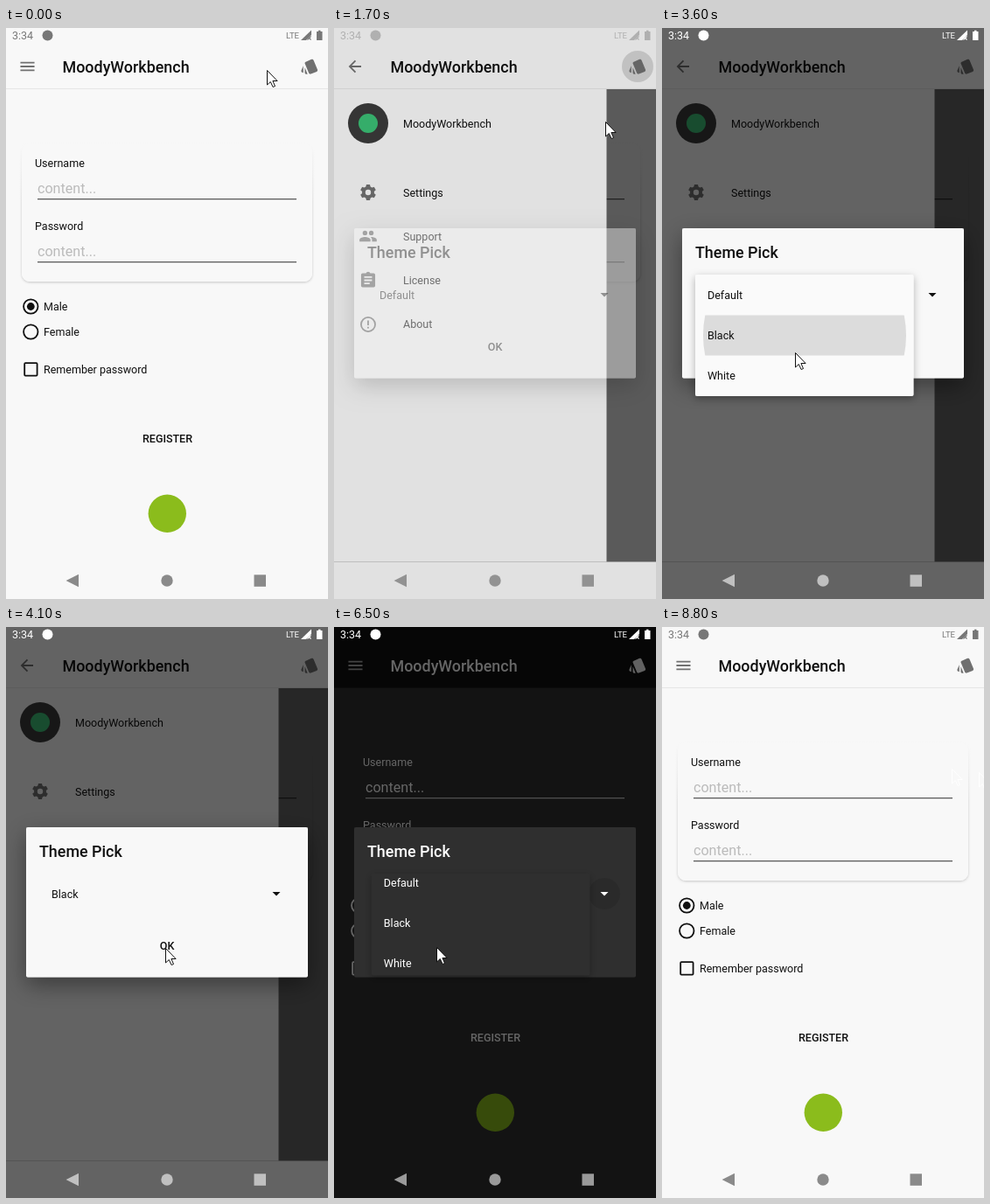
Animation, 368 px wide and 653 px high, one loop 9 s. Source, as an HTML page with a canvas:

```html
<!DOCTYPE html>
<html lang="en">
<head>
<meta charset="utf-8">
<title>Theme picker</title>
<style>
  html, body { margin: 0; width: 100%; height: 100%; overflow: hidden; background: #f8f8f8; }
  canvas { display: block; }
</style>
</head>
<body>
<canvas id="stage" width="368" height="653"></canvas>
<script>
const ctx = document.getElementById('stage').getContext('2d');
const W = 368, H = 653, LOOP = 9000, STEP = 100;
const BAR_BOTTOM = 69, NAV_TOP = 610.5, DRAWER = 311.5;
const DP = 0.895;
const APP_NAME = 'MoodyWorkbench';

const LIGHT = {
  bg: '#f8f8f8', bar: '#f8f8f8', edge: '#e6e6e6', text: '#101010', hint: '#bbb', line: '#5c5c5c',
  icon: '#707070', burger: '#707070', popup: '#fafafa', press: '#dcdcdc', ripple: 'rgba(0,0,0,.14)',
  shadow: 0.4, status: [119, 255], nav: [138, 192]
};
const DARK = {
  bg: '#2f2f2f', bar: '#0e0e0e', edge: '#1c1c1c', text: '#fff', hint: '#fff', line: '#c4c4c4',
  icon: '#f4f4f4', burger: '#a8a8a8', popup: '#2f2f2f', press: '#444', ripple: 'rgba(255,255,255,.12)',
  shadow: 0, status: [255, 255], nav: [180, 154]
};

const ICONS = {
  style: 'M3.9 20.2V11.2L1.4 17c-.4 1 .1 2.2 1.1 2.6zM22 16 17 4c-.4-1-1.6-1.5-2.6-1.1L7.1 6C6 6.4 5.6 7.5 6 8.5l5 12c.4 1 1.6 1.5 2.6 1.1l7.4-3C22 18.1 22.5 17 22 16zM5.9 19.7c0 1.1.9 2 2 2h1.5L5.9 13.4z',
  people: 'M16 11a3 3 0 1 0 0-6 3 3 0 0 0 0 6zM8 11a3 3 0 1 0 0-6 3 3 0 0 0 0 6zM8 13c-2.3 0-7 1.2-7 3.5V19h14v-2.5C15 14.2 10.3 13 8 13zM16 13l-1 .1c1.2.8 2 2 2 3.4V19h6v-2.5C23 14.2 18.3 13 16 13z',
  list: 'M19 3h-4.2a3 3 0 0 0-5.6 0H5a2 2 0 0 0-2 2v14a2 2 0 0 0 2 2h14a2 2 0 0 0 2-2V5a2 2 0 0 0-2-2zM14 17H7v-2h7zM17 13H7v-2h10zM17 9H7V7h10z',
  alert: 'M12 2a10 10 0 1 0 0 20 10 10 0 0 0 0-20zM12 4a8 8 0 1 1 0 16 8 8 0 0 1 0-16zM11 15h2v2h-2zM11 7h2v6h-2z'
};
const CURSOR = new Path2D('M0 0V16.5L3.8 13 6.6 19 9 18 6.4 12H11.6z');

// time, x, y of the pointer tip
const POINTER = [
  [0, 298, 48], [500, 23, 55], [1000, 23, 55], [1400, 343, 42], [1600, 343, 44], [1700, 310, 107],
  [2100, 302, 300], [2600, 302, 300], [2900, 108, 397], [3100, 108, 397], [3400, 108, 354],
  [3500, 108, 354], [3600, 152, 371], [3700, 152, 371], [4000, 182, 367], [4200, 182, 367],
  [4700, 329, 110], [5000, 329, 110], [5400, 344, 45], [5600, 344, 45], [6000, 302, 300],
  [6300, 302, 300], [6500, 117, 366], [6700, 107, 394], [6800, 107, 394], [6900, 107, 392],
  [7200, 107, 392], [7700, 182, 367], [8200, 182, 367], [8600, 331, 162], [8700, 362, 166], [8800, 384, 168]
];

const lerp = (a, b, p) => a + (b - a) * p;
const ramp = (t, start, length) => Math.min(1, Math.max(0, (t - start) / length));
const smooth = p => p * p * (3 - 2 * p);
const gray = v => { v = Math.round(v); return `rgb(${v},${v},${v})`; };

function text(str, x, y, color, size = 12.53, weight = 400, align = 'left') {
  ctx.font = `${weight} ${size}px Roboto, sans-serif`;
  ctx.textAlign = align;
  ctx.fillStyle = color;
  ctx.fillText(str, x, y);
}
function rect(x, y, w, h, color) {
  ctx.fillStyle = color;
  ctx.fillRect(x, y, w, h);
}
function circle(x, y, r, fill, stroke, width = 2) {
  ctx.beginPath();
  ctx.arc(x, y, r, 0, 2 * Math.PI);
  if (fill) { ctx.fillStyle = fill; ctx.fill(); }
  if (stroke) { ctx.strokeStyle = stroke; ctx.lineWidth = width; ctx.stroke(); }
}
function polygon(points, color) {
  ctx.beginPath();
  points.forEach(p => ctx.lineTo(...p));
  ctx.fillStyle = color;
  ctx.fill();
}

// Rounded box whose shadow stays outside it, so it can be translucent
function panel(x, y, w, h, r, color, blur, drop, alpha) {
  const shape = new Path2D(), outside = new Path2D();
  shape.roundRect(x, y, w, h, r);
  outside.rect(0, 0, W, H);
  outside.addPath(shape);
  ctx.save();
  ctx.clip(outside, 'evenodd');
  ctx.shadowColor = `rgba(0,0,0,${alpha})`;
  ctx.shadowBlur = blur;
  ctx.shadowOffsetY = drop;
  ctx.fillStyle = color;
  ctx.fill(shape);
  ctx.restore();
  ctx.fillStyle = color;
  ctx.fill(shape);
}
function icon(name, cx, cy, color) {
  ctx.save();
  ctx.translate(cx - 12 * DP, cy - 12 * DP);
  ctx.scale(DP, DP);
  ctx.fillStyle = color;
  ctx.fill(new Path2D(ICONS[name]), 'evenodd');
  ctx.restore();
}
function gear(cx, cy, color) {
  circle(cx, cy, 5.1, null, color, 3.8);
  for (let i = 0; i < 6; i++) {
    ctx.save();
    ctx.translate(cx, cy);
    ctx.rotate(i * Math.PI / 3);
    polygon([[-2.7, -6], [-2, -9], [2, -9], [2.7, -6]], color);
    ctx.restore();
  }
}

// Hamburger (p = 0) turning into a back arrow (p = 1)
function menuIcon(p, closing, color) {
  const head = lerp(18, 8 * Math.SQRT2, p), shaft = lerp(18, 16, p), cut = lerp(0, 0.7, p);
  const angle = p * Math.PI / 4, offset = lerp(5, -0.7, p);
  const dx = head * Math.cos(angle), dy = head * Math.sin(angle);
  ctx.save();
  ctx.translate(24.5, 44);
  ctx.scale(DP, DP);
  ctx.rotate((closing ? 1 : -1) * Math.PI * (1 - p));
  ctx.beginPath();
  ctx.moveTo(-shaft / 2 + cut, 0);
  ctx.lineTo(shaft / 2 - cut, 0);
  for (const side of [1, -1]) {
    ctx.moveTo(-shaft / 2, side * offset);
    ctx.lineTo(-shaft / 2 + dx, side * (offset + dy));
  }
  ctx.strokeStyle = color;
  ctx.lineWidth = 2;
  ctx.stroke();
  ctx.restore();
}

function form(c) {
  if (c === LIGHT) {
    panel(18, 132, 332, 158, 9, c.bg, 3, 1, 0.2);
    const fade = ctx.createLinearGradient(0, 126, 0, 200);
    fade.addColorStop(0, c.bg);
    fade.addColorStop(1, 'rgba(248,248,248,0)');
    rect(10, 126, 348, 74, fade);
  }
  [['Username', 159], ['Password', 231]].forEach(([label, y]) => {
    text(label, 33, y, c.text);
    text('content...', 36, y + 30, c.hint, 16.1);
    rect(36, y + 36, 296, 1.3, c.line);
  });
  [['Male', 318.5], ['Female', 347.5]].forEach(([label, y]) => {
    circle(28.3, y, 8.2, null, c.text, 1.8);
    text(label, 43, y + 4.8, c.text);
  });
  circle(28.3, 318.5, 4.4, c.text);
  ctx.lineWidth = 1.8;
  ctx.beginPath();
  ctx.roundRect(21.2, 383.2, 14.4, 14.4, 1);
  ctx.stroke();
  text('Remember password', 43, 395, c.text);
  text('REGISTER', 184.5, 474, c.text, 12.53, 500, 'center');
  circle(184.3, 555.3, 21.7, '#8bbc1c');
}

function drawer(c, open) {
  ctx.save();
  ctx.beginPath();
  ctx.rect(0, BAR_BOTTOM, W, NAV_TOP - BAR_BOTTOM);
  ctx.clip();
  rect(0, 0, W, H, `rgba(0,0,0,${0.6 * open})`);
  ctx.translate(DRAWER * (open - 1), 0);
  rect(0, BAR_BOTTOM, DRAWER, H, c.bg);
  circle(39, 109, 23, '#3a3a3a');
  circle(39, 109, 11, '#3bbf75');
  text(APP_NAME, 79, 113.5, c.text);
  gear(39, 188, c.icon);
  icon('people', 39, 238, c.icon);
  icon('list', 39, 288.5, c.icon);
  icon('alert', 39, 339, c.icon);
  ['Settings', 'Support', 'License', 'About'].forEach((s, i) => text(s, 79, 192.7 + i * 50.2, c.text));
  ctx.restore();
}

function statusBar(color) {
  text('3:34', 7, 13, color, 12.53);
  circle(47.5, 8.5, 6, color);
  text('LTE', 320, 12, color, 9.6);
  polygon([[337, 14], [349, 2.5], [349, 8], [343, 14]], color);
  ctx.strokeStyle = color;
  ctx.lineWidth = 1.1;
  ctx.beginPath();
  ctx.moveTo(344.5, 9.5); ctx.lineTo(348.5, 13.5);
  ctx.moveTo(348.5, 9.5); ctx.lineTo(344.5, 13.5);
  ctx.stroke();
  rect(355, 4, 6.5, 10, color);
  rect(357, 2.7, 2.5, 2, color);
}

function navBar(color) {
  polygon([[68.6, 632], [83, 624.7], [83, 639.3]], color);
  circle(184, 632, 6.7, color);
  rect(283.5, 625.3, 13.5, 13.5, color);
}

function dialog(c, alpha, choice, rippling) {
  ctx.save();
  ctx.globalAlpha = alpha;
  panel(23, 229, 322, 171.5, 2, c.bg, 26, 9, c.shadow);
  text('Theme Pick', 38, 262.5, c.text, 17.9, 500);
  text(choice, 52, 310, c.text);
  if (rippling) circle(309, 305, 18, 'rgba(0,0,0,.1)');
  polygon([[304.5, 303], [313.5, 303], [309, 307.5]], c.text);
  text('OK', 184, 369, c.text, 12.53, 500, 'center');
  ctx.restore();
}

function dropdown(c, open, alpha, pressed) {
  const shift = 1 - open;
  ctx.save();
  ctx.globalAlpha = alpha;
  ctx.translate(8 * shift, 0);
  panel(38, 282, 249.5, 139 - 38 * shift, 2, c.popup, 9, 3, 0.3);
  ctx.beginPath();
  ctx.rect(38, 282, 249.5, 139 - 38 * shift);
  ctx.clip();
  ctx.translate(0, -22 * shift);
  if (pressed >= 0) {
    const y = 328.5 + 46 * (pressed - 1);
    ctx.save();
    ctx.beginPath();
    ctx.rect(38, y, 250, 46);
    ctx.clip();
    circle(163, y + 23, 116, c.press);
    ctx.restore();
  }
  ['Default', 'Black', 'White'].forEach((s, i) => text(s, 52, 310.2 + 46 * i, c.text));
  ctx.restore();
}

function drawCursor(x, y, outline, fill) {
  ctx.save();
  ctx.translate(x + 0.5, y + 0.5);
  if (fill) { ctx.fillStyle = fill; ctx.fill(CURSOR); }
  ctx.strokeStyle = outline;
  ctx.lineWidth = 1;
  ctx.stroke(CURSOR);
  ctx.restore();
}
function pointer(t) {
  const i = POINTER.findIndex(k => k[0] > t);
  const [t0, x0, y0] = POINTER[i - 1], [t1, x1, y1] = POINTER[i];
  const p = ramp(t, t0, t1 - t0);
  drawCursor(lerp(x0, x1, p), lerp(y0, y1, p), '#111', '#fff');
}

function draw(t) {
  const c = t >= 4300 && t < 8200 ? DARK : LIGHT;
  const closing = t >= 4700;
  const open = closing ? (1 - ramp(t, 4800, 480)) ** 2 : 1 - (1 - ramp(t, 600, 500)) ** 3;
  const dim = smooth(ramp(t, 1600, 400)) - smooth(ramp(t, 4100, 300))
            + smooth(ramp(t, 5500, 400)) - smooth(ramp(t, 7900, 300));
  const dialogAlpha = ramp(t, 1600, 240) - ramp(t, 4100, 200) + ramp(t, 5500, 240) - ramp(t, 7900, 200);

  rect(0, 0, W, H, c.bg);
  form(c);
  if (open > 0) drawer(c, open);
  rect(0, 0, W, BAR_BOTTOM, c.bar);
  rect(0, BAR_BOTTOM, W, 1, c.edge);
  menuIcon(open, closing, c.burger);
  text(APP_NAME, 64.5, 51, c.text, 17.9, 500);
  if ((t >= 1500 && t < 1900) || (t >= 5600 && t < 5900)) circle(347, 44, 18, c.ripple);
  icon('style', 347, 44, c.icon);

  rect(0, 0, W, H, `rgba(0,0,0,${0.6 * dim})`);
  statusBar(gray(lerp(...c.status, dialogAlpha)));
  navBar(gray(lerp(...c.nav, dim)));

  if (dialogAlpha > 0) {
    const choice = t < 3700 ? 'Default' : t < 7400 ? 'Black' : 'White';
    dialog(c, dialogAlpha, choice, t >= 6400 && t < 6600);
  }
  if (t > 2600 && t < 3900) {
    dropdown(c, ramp(t, 2600, 250), 1 - ramp(t, 3700, 200), t >= 3600 ? 1 : -1);
  } else if (t > 6400 && t < 7600) {
    dropdown(c, ramp(t, 6400, 250), 1 - ramp(t, 7400, 200), t >= 7300 ? 2 : -1);
  }

  if (t < 8800) {
    pointer(t);
  } else {
    drawCursor(331, 162, '#fff');
    drawCursor(362, 166, '#fff');
  }
}

function frame(now) {
  draw(Math.floor(now % LOOP / STEP) * STEP);
  requestAnimationFrame(frame);
}
requestAnimationFrame(frame);
</script>
</body>
</html>
```
